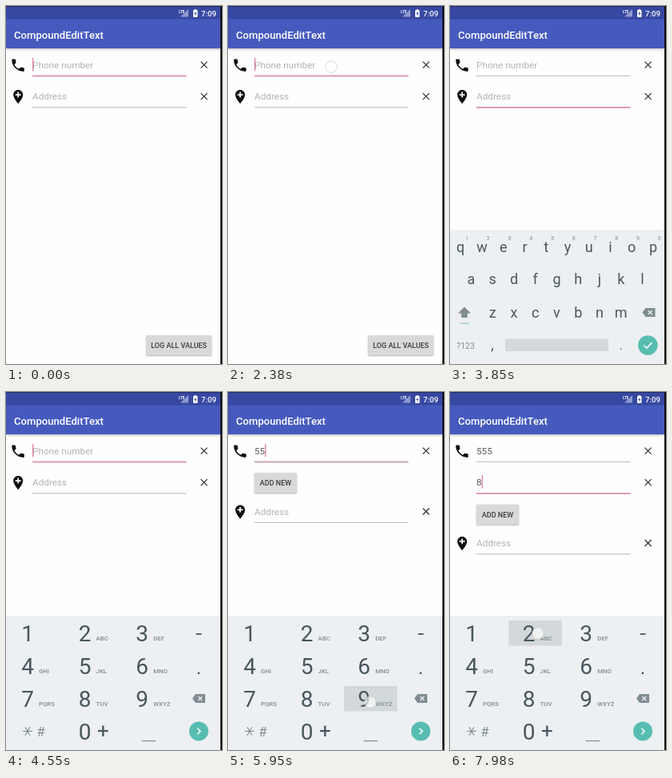
Animation of 270 by 448 pixels, one loop 8000 ms. Source, as an HTML page with a canvas:

```html
<!DOCTYPE html>
<html lang="en">
<head>
<meta charset="utf-8">
<title>CompoundEditText</title>
<style>
html, body { margin: 0; width: 100%; height: 100%; overflow: hidden; background: #fff; }
canvas { display: block; width: 270px; height: 448px; }
</style>
</head>
<body>
<canvas id="stage"></canvas>
<script>
const W = 270, H = 448, LOOP = 8000;
const canvas = document.getElementById('stage');
const ctx = canvas.getContext('2d');
const dpr = window.devicePixelRatio || 1;
canvas.width = W * dpr;
canvas.height = H * dpr;

const PINK = '#e59bb4', MUTED = '#cca6b5', GREY = '#c3c3c3';
const INK = '#48565d', SOFT = '#7f8c92', TEAL = '#58bdb1', KEY_DOWN = '#d3d9db';
const KB_TOP = 280, KB_H = 168;

const phoneIcon = new Path2D('M6.62 10.79c1.44 2.83 3.76 5.14 6.59 6.59l2.2-2.2c.27-.27.67-.36 1.02-.24 1.12.37 2.33.57 3.57.57.55 0 1 .45 1 1V20c0 .55-.45 1-1 1-9.39 0-17-7.61-17-17 0-.55.45-1 1-1h3.5c.55 0 1 .45 1 1 0 1.25.2 2.45.57 3.57.11.35.03.74-.25 1.02l-2.2 2.2z');
const pinIcon = new Path2D('M12 2C8.14 2 5 5.14 5 9c0 5.25 7 13 7 13s7-7.75 7-13c0-3.86-3.14-7-7-7zm4 8h-3v3h-2v-3H8V8h3V5h2v3h3v2z');

// Touches: start, end, x, y
const touches = [
  [2100, 2440, 129, 76], [3080, 3230, 122, 114], [4130, 4280, 126, 76],
  [5180, 5370, 120, 370], [5530, 5660, 102, 425], [5900, 6010, 178, 388],
  [6440, 6580, 60, 114], [7350, 7470, 104, 385], [7890, 8000, 110, 302]
];
// Pressed keypad keys: start, end, column, row
const presses = [
  [5180, 5250, 1, 2], [5530, 5650, 1, 3], [5900, 6010, 2, 2],
  [7350, 7420, 1, 2], [7890, 8000, 1, 0]
];
const cursorOff = [
  [280, 770], [1330, 1890], [2740, 3220], [3710, 4210],
  [4760, 5250], [6520, 6580], [7385, 7420]
];

const within = (t, a, b) => t >= a && t < b;
const ramp = (t, a, d) => Math.min(1, Math.max(0, (t - a) / d));

function text(s, x, y, size, color, { weight = 400, align = 'left' } = {}) {
  ctx.font = `${weight} ${size}px Roboto, sans-serif`;
  ctx.textAlign = align;
  ctx.fillStyle = color;
  ctx.fillText(s, x, y);
  return ctx.measureText(s).width;
}
const mid = (s, x, y, size, color, weight) => text(s, x, y, size, color, { weight, align: 'center' });

function rect(x, y, w, h, color, r = 0) {
  ctx.fillStyle = color;
  ctx.beginPath();
  ctx.roundRect(x, y, w, h, r);
  ctx.fill();
}

function line(points, color, width) {
  ctx.strokeStyle = color;
  ctx.lineWidth = width;
  ctx.beginPath();
  points.forEach(([x, y], i) => i ? ctx.lineTo(x, y) : ctx.moveTo(x, y));
  ctx.stroke();
}

function shape(points, color) {
  ctx.fillStyle = color;
  ctx.beginPath();
  points.forEach(([x, y]) => ctx.lineTo(x, y));
  ctx.fill();
}

function disc(x, y, r, color) {
  ctx.fillStyle = color;
  ctx.beginPath();
  ctx.arc(x, y, r, 0, 7);
  ctx.fill();
}

function icon(path, x, y) {
  ctx.save();
  ctx.translate(x, y);
  ctx.scale(0.86, 0.86);
  ctx.translate(-12, -12);
  ctx.fillStyle = '#0c0c0c';
  ctx.fill(path);
  ctx.restore();
}

function cross(x, y, r, color, width) {
  line([[x - r, y - r], [x + r, y + r]], color, width);
  line([[x - r, y + r], [x + r, y - r]], color, width);
}

function withAlpha(a, draw) {
  if (a <= 0) return;
  ctx.save();
  ctx.globalAlpha *= a;
  draw();
  ctx.restore();
}

function shadowed(blur, dy, draw) {
  ctx.save();
  ctx.shadowColor = 'rgba(0,0,0,.3)';
  ctx.shadowBlur = blur * dpr;
  ctx.shadowOffsetY = dy * dpr;
  draw();
  ctx.restore();
}

function button(label, x, y, w, pressed) {
  const h = 25;
  shadowed(2, 1, () => rect(x, y, w, h, pressed ? '#c4c5c5' : '#d8d9d9', 1.5));
  mid(label, x + w / 2, y + 15.8, 9, '#3b3b3b', 500);
}

function header() {
  shadowed(3, 1, () => rect(0, 16, 268, 37, '#465abe'));
  rect(0, 0, 268, 16.5, '#3748a2');
  rect(0, 0, 268, 1, '#222c62');
  text('CompoundEditText', 10, 40.5, 13.1, '#fff', { weight: 500 });
  text('7:09', 263, 13, 9.6, '#fff', { weight: 500, align: 'right' });
  shape([[228, 4], [228, 13.5], [218, 13.5]], '#8f99cd');
  text('LTE', 216, 8.5, 4.6, '#fff', { weight: 700 });
  rect(234, 5, 5.5, 9, '#fff', 0.8);
  rect(235.6, 4, 2.3, 2, '#fff');
  shape([[237.3, 6.4], [235.2, 10], [236.6, 10], [236.2, 12.6], [238.4, 9], [237, 9]], '#3748a2');
}

function field(y, value, hint, focus, cursor) {
  const w = value ? text(value, 33, y + 4.3, 11.75, '#5c5c5c')
                  : (text(hint, 33, y + 4.3, 11.75, '#b3b3b3'), 0);
  if (focus) rect(33, y + 13.2, 192.5, 2, focus);
  else rect(33, y + 13.5, 192.5, 1.2, GREY);
  if (focus && cursor) rect(33 + w, y - 8.5, 1.3, 16.5, '#dd7f9c');
  cross(247.6, y + 0.3, 4, '#333', 1.3);
}

function backspace(x, y) {
  shape([[x - 8, y], [x - 4, y - 5.5], [x + 8, y - 5.5], [x + 8, y + 5.5], [x - 4, y + 5.5]], SOFT);
  cross(x + 1.8, y, 2.5, '#edf0f2', 1.3);
}

function keypad(t) {
  for (const [a, b, col, row] of presses)
    if (within(t, a, b)) rect(1.5 + 71.8 * col, 286 + 41 * row, 66.5, 31.5, KEY_DOWN);
  const subs = ['', 'ABC', 'DEF', 'GHI', 'JKL', 'MNO', 'PQRS', 'TUV', 'WXYZ'];
  subs.forEach((sub, i) => {
    const x = 27 + 71.6 * (i % 3), y = 311.5 + 41 * Math.floor(i / 3);
    mid(String(i + 1), x, y, 28, INK);
    text(sub, x + 14, y - 0.5, 7.8, SOFT, { weight: 500 });
  });
  mid('0', 98.5, 434.5, 28, INK);
  mid('+', 121.5, 433, 26, INK);
  // Star and hash
  for (let i = 0; i < 3; i++) {
    const a = i * Math.PI / 3, dx = 6 * Math.cos(a), dy = 6 * Math.sin(a);
    line([[27 - dx, 424.5 - dy], [27 + dx, 424.5 + dy]], SOFT, 1.1);
  }
  mid('#', 43.5, 430.5, 17, SOFT);
  rect(169.5, 436, 17.5, 1.2, SOFT);
  rect(237.5, 302, 7, 1.8, INK);
  rect(239.7, 350.5, 2.3, 2.5, INK);
  backspace(241, 383.5);
  disc(241, 424.5, 12, TEAL);
  line([[239.3, 420.8], [243, 424.5], [239.3, 428.2]], '#fff', 1.5);
}

function qwerty() {
  const row = (letters, x, y) => [...letters].forEach((c, i) => mid(c, x + 26.75 * i, y, 18, INK));
  row('qwertyuiop', 13.2, 307.5);
  [...'1234567890'].forEach((c, i) => mid(c, 21 + 26.75 * i, 292.5, 7, SOFT));
  row('asdfghjkl', 26.5, 348);
  row('zxcvbnm', 53.2, 389.5);
  shape([[18, 376.5], [26, 384.5], [21.8, 384.5], [21.8, 390], [14.2, 390], [14.2, 384.5], [10, 384.5]], SOFT);
  rect(12, 396.5, 12, 1.6, '#a9cfcc');
  backspace(248.5, 383.5);
  mid('?123', 19.5, 428.5, 10.5, SOFT);
  mid(',', 53, 430, 18, INK);
  rect(69, 416.5, 129, 15.5, '#d2d8db', 2);
  mid('.', 213.5, 430, 18, SOFT);
  disc(247.3, 424.5, 12.3, TEAL);
  line([[242.3, 424.7], [245.8, 428.2], [252.2, 421.4]], '#fff', 1.6);
}

function keyboard(t) {
  if (t < 2410) return;
  const slide = Math.pow(1 - ramp(t, 2410, 390), 3);
  ctx.save();
  ctx.translate(0, KB_H * slide);
  rect(0, KB_TOP, 268, KB_H + 1, '#edf0f2');
  if (within(t, 3290, 4340)) qwerty();
  else keypad(t);
  ctx.restore();
}

function touch(t) {
  for (const [a, b, x, y] of touches) {
    if (!within(t, a, b)) continue;
    disc(x, y, 7.3, 'rgba(255,255,255,.65)');
    ctx.strokeStyle = 'rgba(190,194,196,.6)';
    ctx.lineWidth = 1;
    ctx.stroke();
  }
}

function typed(t) {
  const n = t < 5250 ? 0 : t < 5670 ? 1 : t < 6020 ? 2 : 3;
  return '5'.repeat(n);
}

function addNewAlpha(t) {
  if (t < 6580) return ramp(t, 5550, 300);
  return t < 7420 ? 1 - ramp(t, 6580, 300) : ramp(t, 7680, 280);
}

function draw(t) {
  ctx.setTransform(dpr, 0, 0, dpr, 0, 0);
  rect(0, 0, W, H, '#fefefe');
  const cursor = !cursorOff.some(([a, b]) => within(t, a, b));
  const onAddress = within(t, 3220, 4210), added = t >= 6580;
  const addressY = t < 5250 ? 112.8 : !added ? 149.2 : t < 7420 ? 152.3 : 188.7;

  header();
  icon(phoneIcon, 15, 74.2);
  const firstFocus = onAddress || added ? null : t < 4760 ? PINK : MUTED;
  field(73.3, typed(t), 'Phone number', firstFocus, cursor);
  if (added) withAlpha(ramp(t, 6860, 280), () =>
    field(112.8, t < 7420 ? '' : '8', 'Phone number', PINK, cursor));
  const buttonY = !added || t < 7420 ? 101.2 : 140.7;
  withAlpha(addNewAlpha(t), () =>
    button('ADD NEW', 33, buttonY, 53, within(t, 6440, 6700)));
  icon(pinIcon, 15.2, addressY + 0.8);
  field(addressY, '', 'Address', onAddress && PINK, cursor);
  button('LOG ALL VALUES', 175.3, 412, 81.7, false);

  keyboard(t);
  touch(t);
  rect(268, 0, 2, H, '#0a0a0c');
}

const start = performance.now();
function frame() {
  draw((performance.now() - start) % LOOP);
  requestAnimationFrame(frame);
}
frame();
</script>
</body>
</html>
```
